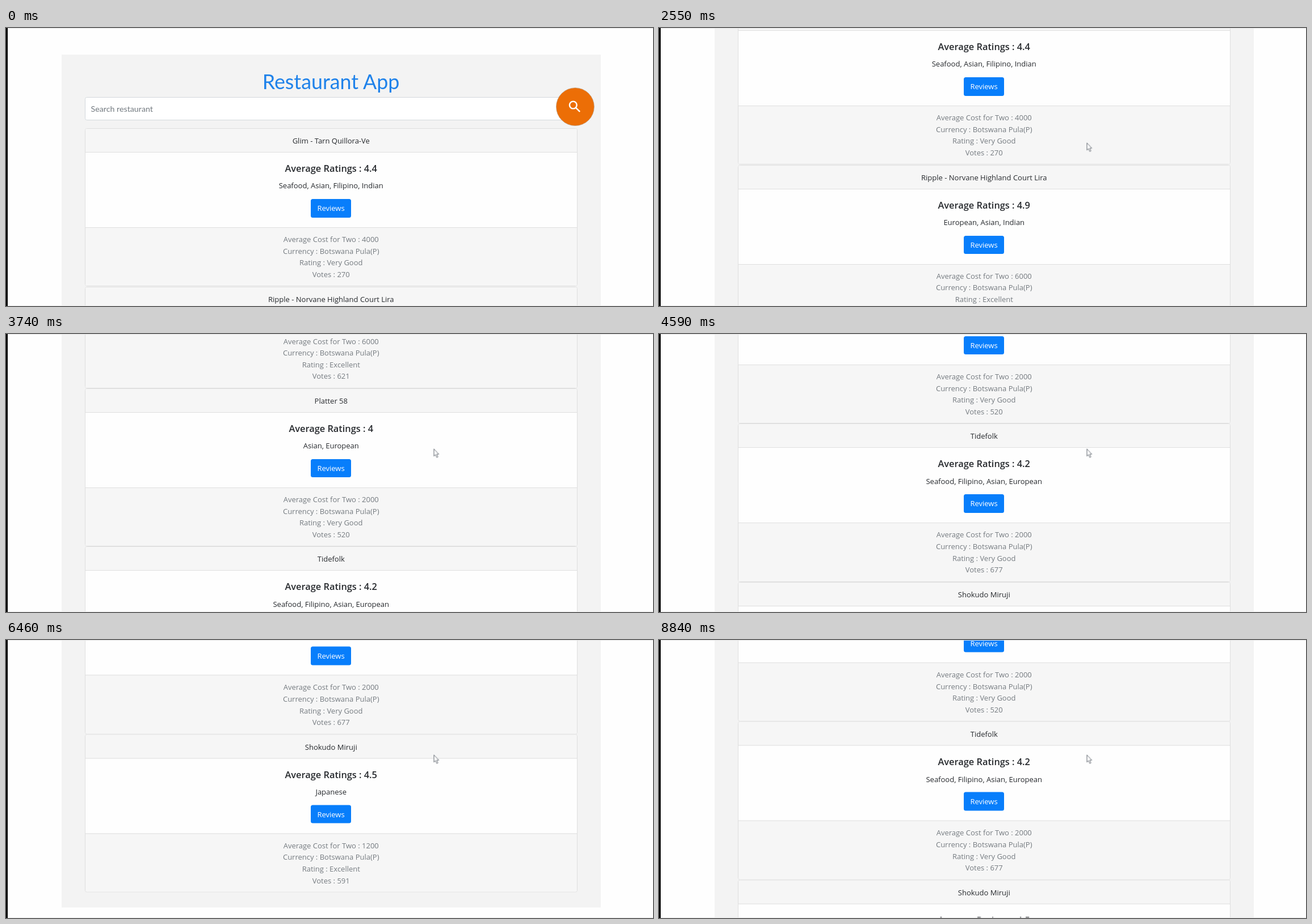
An HTML page that plays this animation: 1140 by 491 pixels, repeating every 9690 ms.

```html
<!DOCTYPE html>
<html lang="en">
<head>
<meta charset="utf-8">
<title>Restaurant App</title>
<style>
  html, body { margin: 0; width: 100%; height: 100%; overflow: hidden; background: #fff; }
  #stage { position: relative; width: 1140px; height: 491px; overflow: hidden; background: #fefefe;
    font: 13px/20.6px "Open Sans", "Noto Sans", sans-serif; color: #26292d; }
  #stage * { box-sizing: border-box; }
  #page, #page > *, .card > *, #cursor, .edge { position: absolute; }
  #page { left: 0; top: 0; width: 1140px; height: 1620px; }
  .panel { left: 98px; top: 46.5px; width: 950px; height: 1554px; background: #f3f3f3; }
  h1 { left: 98px; top: 71.5px; width: 949px; margin: 0; text-align: center; color: #1f82ea;
    font: 400 35.8px/46px Lato, sans-serif; }
  .search { left: 138.5px; top: 122px; width: 868.5px; height: 41.2px; padding-left: 10px; background: #fff;
    border: 1px solid #d3d8dc; border-radius: 3.5px; color: #737a80; font: 14.25px/39.5px Lato, sans-serif; }
  .go { left: 969px; top: 105px; width: 68px; height: 68px; }
  .card { left: 138.5px; width: 868.5px; height: 279.3px; background: #fefefe;
    border: 1px solid #dfdfdf; border-radius: 3.5px; text-align: center; overflow: hidden; }
  .card > * { left: 0; width: 100%; }
  .name { top: 0; height: 42px; line-height: 42.4px; background: #f6f6f6; border-bottom: 1px solid #dfdfdf; }
  .rating { top: 58px; font-size: 16.35px; line-height: 24px; font-weight: 600; }
  .food { top: 90.3px; }
  .card .button { left: 397.6px; top: 124px; width: 70.8px; height: 32.4px; line-height: 32.4px;
    border-radius: 3.5px; background: #087efb; color: #fff; }
  .foot { top: 174px; bottom: 0; padding-top: 10px; background: #f6f6f6;
    border-top: 1px solid #dfdfdf; color: #757b80; }
  #cursor { left: 0; top: 0; width: 12px; height: 18px; overflow: visible; }
  .edge { left: 0; width: 100%; height: 1px; }
</style>
</head>
<body>
<div id="stage">
  <div id="page">
    <div class="panel"></div>
    <h1>Restaurant App</h1>
    <div class="search">Search restaurant</div>
    <svg class="go" viewBox="0 0 68 68">
      <circle cx="33.9" cy="34.1" r="33.4" fill="#ec6e06" stroke="#b99a7c" stroke-width=".7"/>
      <g transform="translate(19.3 20) scale(1.16)" fill="none" stroke="#fff" stroke-width="2.1">
        <circle cx="9.5" cy="9.5" r="5.5"/>
        <path d="M13.6 13.6L19.7 19.7"/>
      </g>
    </svg>
  </div>
  <svg id="cursor" viewBox="0 0 12 18">
    <path d="M.5 .5V13.2L3.3 10.6 5.4 15.6 7.6 14.7 5.5 9.8H9.2Z" fill="#fcfcfc" stroke="#666c74" stroke-width="1"/>
  </svg>
  <div class="edge" style="top:0;background:#e6e6e6"></div>
  <div class="edge" style="top:490px;background:#eeeeee"></div>
  <div class="edge" style="top:0;width:3px;height:491px;background:#000"></div>
</div>
<script>
const LOOP = 9690;
const page = document.getElementById('page');
const cursor = document.getElementById('cursor');

// name, rating, cuisines, cost, verdict, votes
const places = [
  ['Glim - Tarn Quillora-Ve', 4.4, 'Seafood, Asian, Filipino, Indian', 4000, 'Very Good', 270],
  ['Ripple - Norvane Highland Court Lira', 4.9, 'European, Asian, Indian', 6000, 'Excellent', 621],
  ['Platter 58', 4, 'Asian, European', 2000, 'Very Good', 520],
  ['Tidefolk', 4.2, 'Seafood, Filipino, Asian, European', 2000, 'Very Good', 677],
  ['Shokudo Miruji', 4.5, 'Japanese', 1200, 'Excellent', 591],
];

places.forEach(([name, rating, food, cost, verdict, votes], i) => {
  const card = document.createElement('div');
  card.className = 'card';
  card.style.top = 177.2 + i * 279.4 + 'px';
  card.innerHTML = `
    <div class="name">${name}</div>
    <div class="rating">Average Ratings : ${rating}</div>
    <div class="food">${food}</div>
    <div class="button">Reviews</div>
    <div class="foot">Average Cost for Two : ${cost}<br>Currency : Botswana Pula(P)<br>
      Rating : ${verdict}<br>Votes : ${votes}</div>`;
  page.append(card);
});

// One wheel notch moves the page by NOTCH; the last one stops at the page end.
const NOTCH = 85.7, END = 1128.5;
const scroll = [
  [0, 0],
  [1360, 52], [1530, NOTCH],
  [1870, 140], [2040, 2 * NOTCH],
  [2550, 215], [2720, 300], [2890, 385], [3060, 5 * NOTCH],
  [3400, 475], [3570, 560], [3740, 640], [3910, 8 * NOTCH],
  [4250, 735], [4420, 815], [4590, 10 * NOTCH],
  [5100, 892], [5270, 11 * NOTCH], [5440, 966.4], [5610, 1010], [5780, 1043],
  [5950, 1085], [6120, 1118], [6290, 1126], [6460, END],
  [8500, 1085], [8670, 950], [8840, END - 3 * NOTCH],
];
const pointer = [[0, 800, 500], [340, 790, 440], [510, 768, 290], [680, 753.5, 202.5]];

// Each pose holds until the next one.
function hold(el, poses, toTransform) {
  const frames = poses.map(([t, ...pose]) =>
    ({ offset: t / LOOP, transform: toTransform(...pose), easing: 'step-end' }));
  frames.push({ ...frames[frames.length - 1], offset: 1 });
  el.animate(frames, { duration: LOOP, iterations: Infinity }).startTime = 0;
}

hold(page, scroll, y => `translateY(${-y}px)`);
hold(cursor, pointer, (x, y) => `translate(${x}px, ${y}px)`);
</script>
</body>
</html>
```
